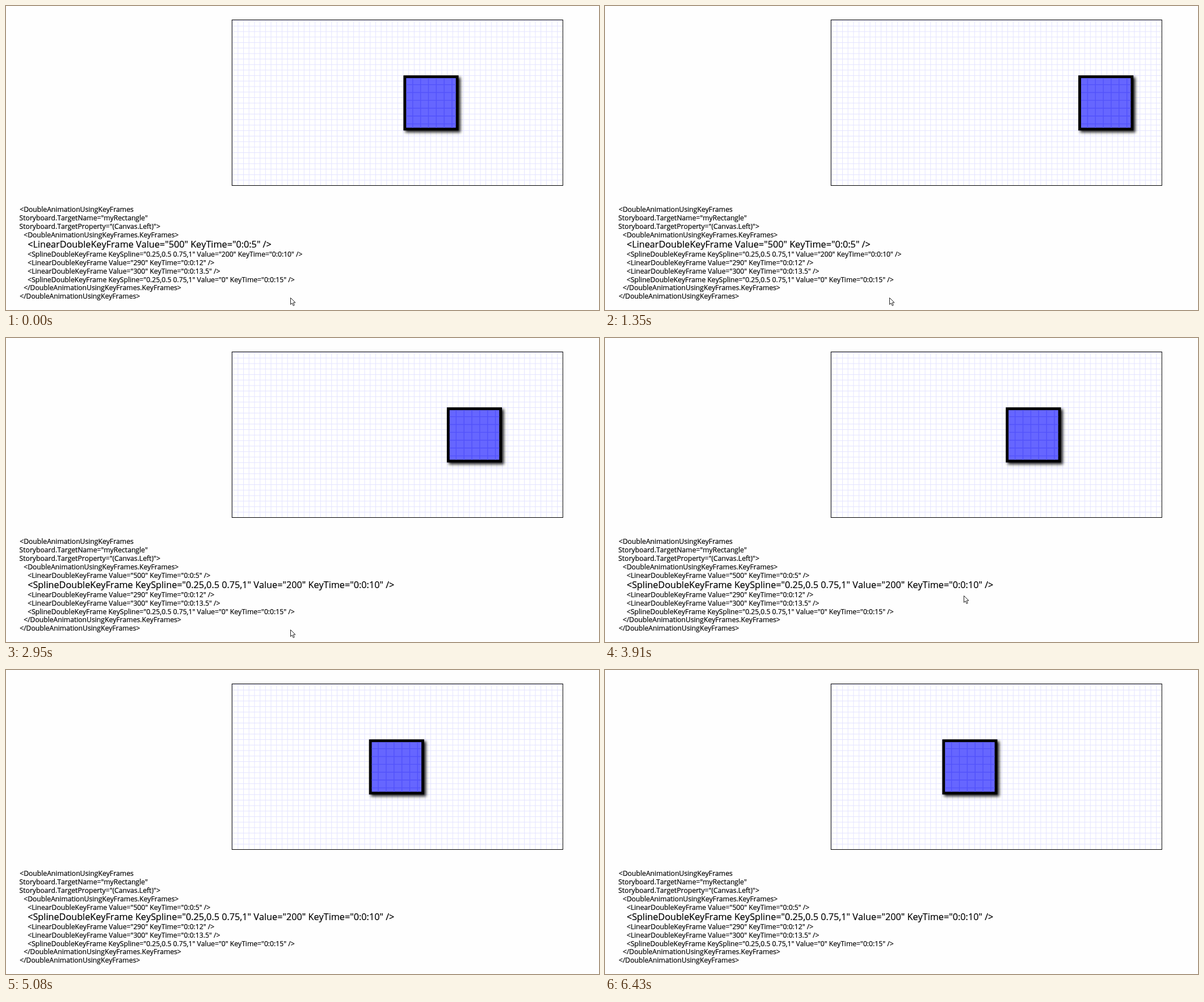
Animation, 1045 px wide and 536 px high, one loop 6530 ms. Source, as an HTML page:

```html
<!DOCTYPE html>
<html lang="en">
<head>
<meta charset="utf-8">
<title>Key frame animation</title>
<style>
  html, body { margin: 0; width: 100%; height: 100%; overflow: hidden; background: #fefefe; }
  svg { display: block; width: 1045px; height: 536px; }
  text {
    font-family: "Open Sans", "Noto Sans", sans-serif; font-kerning: none; white-space: pre;
    stroke: #000; stroke-width: 0.2px;
  }
</style>
</head>
<body>
<svg viewBox="0 0 1045 536">
  <defs>
    <filter id="shadow" x="-20%" y="-20%" width="140%" height="140%">
      <feDropShadow dx="3.4" dy="3.4" stdDeviation="2.7" flood-color="#000" flood-opacity="0.85"/>
    </filter>
  </defs>
  <rect x="398" y="24.5" width="583" height="292" fill="#fff"/>
  <path id="grid" stroke="#e4e4ff" fill="none"/>
  <rect x="398.3" y="24.5" width="583" height="292" fill="none" stroke="#000"/>
  <g id="box">
    <rect x="2.43" y="2.43" width="92.3" height="92.3" fill="#6666ff" stroke="#000" stroke-width="4.86" filter="url(#shadow)"/>
    <path id="boxGrid" stroke="#5252fb" stroke-width="1.4" fill="none"/>
  </g>
  <g id="code"></g>
  <path id="cursor" d="M.5 .5V12.3L3.2 9.8L5.2 14.4L7.2 13.5L5.2 9H9Z" fill="#fff" stroke="#222" stroke-width="1"/>
</svg>
<script>
const LOOP = 6530;
const UNIT = 0.972;
const CANVAS_LEFT = 398;
const TURN = 1854;
const FONT = 12.17, LINE = 14.8;

// Redraw ticks: [start, count], 120 ms apart within a run.
const RUNS = [[0, 2], [270, 1], [420, 2], [690, 1], [840, 2], [1110, 3], [1500, 1], [1650, 2],
  [1920, 6], [2670, 2], [2950, 1], [3100, 1], [3250, 1], [3400, 2], [3670, 4], [4180, 3],
  [4570, 2], [4840, 3], [5230, 1], [5380, 1], [5530, 2], [5800, 3], [6190, 3]];

// Pointer path: [time, x, y].
const POINTER = [[2950, 501, 514], [3100, 512, 510], [3250, 576, 478], [3400, 602, 465],
  [3520, 616, 457], [3910, 632, 454], [4030, 656, 447], [4420, 706, 419]];
const POINTER_GONE = 4570;

const CODE = [
  [24.2, '<DoubleAnimationUsingKeyFrames'],
  [23.6, 'Storyboard.TargetName="myRectangle"'],
  [23.6, 'Storyboard.TargetProperty="(Canvas.Left)">'],
  [31.2, '<DoubleAnimationUsingKeyFrames.KeyFrames>'],
  [38.2, '<LinearDoubleKeyFrame Value="500" KeyTime="0:0:5" />'],
  [38.2, '<SplineDoubleKeyFrame KeySpline="0.25,0.5 0.75,1" Value="200" KeyTime="0:0:10" />'],
  [38.2, '<LinearDoubleKeyFrame Value="290" KeyTime="0:0:12" />'],
  [38.2, '<LinearDoubleKeyFrame Value="300" KeyTime="0:0:13.5" />'],
  [38.2, '<SplineDoubleKeyFrame KeySpline="0.25,0.5 0.75,1" Value="0" KeyTime="0:0:15" />'],
  [31.2, '</DoubleAnimationUsingKeyFrames.KeyFrames>'],
  [24.2, '</DoubleAnimationUsingKeyFrames>']
];
const LINEAR_ROW = 4, SPLINE_ROW = 5;

const byId = id => document.getElementById(id);
const clamp01 = v => Math.min(1, Math.max(0, v));
const box = byId('box'), cursor = byId('cursor');

function gridPath(x, y, w, h, offset, step) {
  let d = '';
  for (let p = offset; p < w; p += step) d += `M${x + p} ${y}v${h}`;
  for (let p = offset; p < h; p += step) d += `M${x} ${y + p}h${w}`;
  return d;
}
byId('grid').setAttribute('d', gridPath(398, 24.5, 583, 292, 1.1, 9.705));
byId('boxGrid').setAttribute('d', gridPath(4.86, 4.86, 87.5, 87.5, 11.5, 13.85));

const rows = CODE.map(([x, line]) => {
  const el = document.createElementNS('http://www.w3.org/2000/svg', 'text');
  el.setAttribute('x', x);
  el.textContent = line;
  byId('code').append(el);
  return el;
});

function bezier(u, a, b) {
  const v = 1 - u;
  return 3 * v * v * u * a + 3 * v * u * u * b + u * u * u;
}

function keySpline(x) {
  let lo = 0, hi = 1;
  for (let i = 0; i < 30; i++) {
    const mid = (lo + hi) / 2;
    if (bezier(mid, 0.25, 0.75) < x) lo = mid; else hi = mid;
  }
  return bezier(lo, 0.5, 1);
}

function canvasLeft(t) {
  if (t < TURN) return 500 - (TURN - t) * 0.1019;
  return 500 - 300 * keySpline(clamp01((t - TURN) * 1.034 / 5000));
}

function tick(t) {
  const [start, count] = RUNS.findLast(run => run[0] <= t);
  return start + 120 * Math.min(count - 1, Math.floor((t - start) / 120));
}

function pointerAt(t) {
  const next = POINTER.findIndex(p => p[0] > t);
  if (next === 0) return POINTER[0].slice(1);
  if (next < 0) return POINTER.at(-1).slice(1);
  const [t0, x0, y0] = POINTER[next - 1], [t1, x1, y1] = POINTER[next];
  const k = (t - t0) / (t1 - t0);
  return [x0 + (x1 - x0) * k, y0 + (y1 - y0) * k];
}

function layoutCode(t) {
  const swap = clamp01((t - TURN) / 200);
  let top = 351.5;
  rows.forEach((el, i) => {
    const emphasis = i === LINEAR_ROW ? 1 - swap : i === SPLINE_ROW ? swap : 0;
    const scale = 1 + emphasis / 3;
    el.setAttribute('font-size', FONT * scale);
    el.setAttribute('y', top + 0.8 * LINE * scale);
    top += LINE * scale;
  });
}

function render(time) {
  const t = tick(time);
  box.setAttribute('transform', `translate(${CANVAS_LEFT + canvasLeft(t) * UNIT} 122.3)`);
  layoutCode(t);
  cursor.setAttribute('transform', `translate(${pointerAt(t).join(' ')})`);
  cursor.setAttribute('visibility', t < POINTER_GONE ? 'visible' : 'hidden');
}

const began = performance.now();
function frame() {
  render((performance.now() - began) % LOOP);
  requestAnimationFrame(frame);
}
frame();
</script>
</body>
</html>
```
